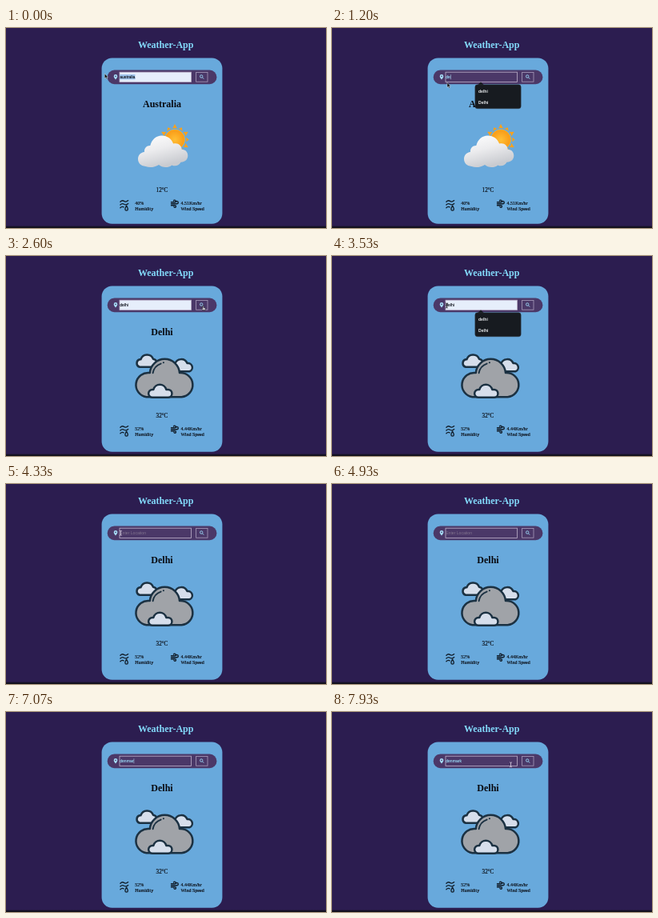
Recreate the animation shown at these times as an HTML page. Size 400x250 px, loop 8000 ms.

```html
<!DOCTYPE html>
<html lang="en">
<head>
<meta charset="utf-8">
<title>Weather-App</title>
<style>
html, body { margin: 0; width: 100%; height: 100%; overflow: hidden; background: #2c1d50; }
svg { display: block; width: 100vw; height: 100vh; }
text { font-family: "Liberation Serif", serif; fill: #080a10; }
.bold { font-weight: 700; font-size: 12px; text-anchor: middle; }
.small { font-size: 6px; }
#details text { stroke: #080a10; stroke-width: .15; }
.sans { font-family: "Liberation Sans", sans-serif; font-size: 5.1px; }
.ink { fill: none; stroke: #101c28; stroke-linecap: round; stroke-linejoin: round; }
.cloud { stroke: #1b3142; stroke-width: 2.5; stroke-linejoin: round; }
</style>
</head>
<body>
<svg viewBox="0 0 400 250">
  <defs>
    <linearGradient id="puff" x1="0" y1="0" x2=".4" y2="1">
      <stop offset="0" stop-color="#fff"/><stop offset=".5" stop-color="#ececee"/><stop offset="1" stop-color="#c9cbd0"/>
    </linearGradient>
    <radialGradient id="sunFill">
      <stop offset="0" stop-color="#ffbf35"/><stop offset="1" stop-color="#f99a16"/>
    </radialGradient>
    <linearGradient id="shade" x1="0" y1="0" x2="0" y2="1">
      <stop offset="0" stop-color="#2c1d50"/><stop offset=".6" stop-color="#11101a"/>
    </linearGradient>
  </defs>

  <rect width="400" height="250" fill="#2c1d50"/>
  <rect y="247" width="400" height="3" fill="url(#shade)"/>
  <text class="bold" x="199.7" y="25" style="fill:#83dafb">Weather-App</text>
  <rect x="119.6" y="37.5" width="150.8" height="207.2" rx="13" fill="#68a9dc"/>

  <!-- search bar -->
  <rect x="126.7" y="52.6" width="136.7" height="17.6" rx="8.8" fill="#4b3868"/>
  <path d="M137 64.6C135.6 62.6 134.7 61.5 134.7 60.4a2.3 2.3 0 0 1 4.6 0C139.3 61.5 138.4 62.6 137 64.6Z" fill="#a9e2fb"/>
  <circle cx="137" cy="60.4" r=".8" fill="#4b3868"/>
  <rect id="field" x="142" y="55.2" width="89.4" height="12.2" stroke="#beb2cb" stroke-width=".8"/>
  <rect id="selection" x="142.2" y="58" height="6.4" fill="#9fc4ec"/>
  <text id="query" class="sans" x="142.2" y="63" stroke-width=".12"></text>
  <rect id="caret" y="58.2" width=".5" height="6" fill="#b7e6fb"/>
  <rect x="237.6" y="55.4" width="14.4" height="11.8" fill="none" stroke="#a99bbb" stroke-width=".8"/>
  <g fill="none" stroke="#9bd9f7" stroke-width=".9">
    <circle cx="244.2" cy="60.5" r="1.7"/><path d="M245.5 61.8l1.7 1.8"/>
  </g>

  <!-- report -->
  <text id="city" class="bold" x="195" y="98.8"></text>
  <g id="details">
    <text id="degrees" x="195" y="204.5" font-size="7.2" text-anchor="middle"></text>
    <text id="humidity" class="small" x="161.2" y="220.6"></text>
    <text class="small" x="161.2" y="227.6">Humidity</text>
    <text id="wind" class="small" x="218.4" y="220.6"></text>
    <text class="small" x="218.4" y="227.6">Wind Speed</text>
    <g class="ink" stroke-width="1.3">
      <path d="M142.9 217.2q2.2-2.4 4.6-.8t5.2-.8M142.9 221q2.2-2.4 4.6-.8t5.2-.8M142.9 224.8q2-2.2 4.2-.9"/>
      <path d="M150.6 222c-1.2 2.2-1.7 3.2-1.7 4.4a1.7 1.7 0 0 0 3.4 0c0-1.2-.5-2.2-1.7-4.4Z"/>
    </g>
    <g class="ink" stroke-width="1.35" transform="translate(.7 .5)">
      <path d="M205.8 217.2h4.2a1.3 1.3 0 1 0-1.2-1.7M205.8 219.2h7.2a1.6 1.6 0 1 0-1.5-2.2M205.8 221.2h4.6a1.3 1.3 0 1 1-1.2 1.7"/>
    </g>
  </g>

  <g id="sunny">
    <g id="rays" fill="#f8a11d"></g>
    <circle cx="211" cy="139.5" r="12.4" fill="url(#sunFill)" stroke="#fbb62e" stroke-width=".8"/>
    <path d="M174.5 173C168 172.5 165 168.5 165 163.8c0-4.8 3.3-8.2 8-8.7-.5-4.8 3-8.3 7.3-8.1 1.6-7.2 7.2-12.6 14.5-12.6 6.9 0 12.3 4.2 14.3 10.2 5.7-1.6 10.3 1.9 10.6 7.2 4.6.1 7.6 3.4 7.6 7.7 0 4.8-3.7 8.3-8.8 8.2-2.4 4.2-7.2 5.8-11.2 3.7-4.5 3.7-12.2 3.5-16.2-.4-5 3.2-11.7 4-16.6 2Z" fill="url(#puff)"/>
  </g>

  <g id="cloudy" class="cloud">
    <path d="M167 138.8a5 5 0 0 1 .2-9.6h1.3a8.2 8.2 0 0 1 15.5-.5 5.3 5.3 0 0 1 1.3 10.1Z" fill="#d6deeb"/>
    <path d="M212 144.3l-3-9.2h2.2a8.1 8.1 0 0 1 15.3-1 5.3 5.3 0 0 1 2.8 10.2Z" fill="#d6deeb"/>
    <path d="M175.5 176.2A15.2 15.2 0 1 1 179.8 146.1 18.65 18.65 0 0 1 217 146.1 15.1 15.1 0 1 1 219.5 176.2Z" fill="#a0a3a8"/>
    <path d="M183.6 146.2a15 15 0 0 1 10-11.6M196.8 133.2h.2" fill="none" stroke-linecap="round" stroke-width="2"/>
    <path d="M183 176.8a4.9 4.9 0 0 1 .1-9.8h1.2a8.3 8.3 0 0 1 16-.1h2a4.9 4.9 0 0 1 .4 9.9Z" fill="#d6deeb"/>
  </g>

  <g id="menu">
    <path d="M182 71.2l4-3.6 4 3.6Z" fill="#171b20"/>
    <rect x="178.8" y="70.8" width="57.4" height="30" rx="3" fill="#171b20" stroke="#343c44" stroke-width=".4"/>
    <rect id="hover" x="180.5" y="74" width="54" height="11" rx="1.5" fill="#3a4149"/>
    <g style="font-weight:700">
      <text class="sans" x="183" y="81.2" style="fill:#e4e7ea">delhi</text>
      <text class="sans" x="183" y="94.6" style="fill:#e4e7ea">Delhi</text>
    </g>
  </g>

  <g id="pointer">
    <path id="arrow" d="M0 0v6l1.4-1.2 1 2.1 1-.5-1-2h1.9Z" fill="#0a0a0c" stroke="#e9edf2" stroke-width=".45"/>
    <path id="beam" d="M-1.4-3Q0-3 0-2 0-3 1.4-3M0-2V2M-1.4 3Q0 3 0 2 0 3 1.4 3" fill="none" stroke-width=".8"/>
    <path id="hand" d="M-.7 3.4L-2.2 1.3q.3-.8 1.5.2V-2q.6-.9 1.2 0V0l2 .6q.7.5.4 1.6l-.5 1.5Z" fill="#c9c6d2" stroke="#15151a" stroke-width=".6"/>
  </g>
</svg>
<script>
const LOOP = 8000;
const $ = id => document.getElementById(id);
const show = (id, on) => { $(id).style.display = on ? '' : 'none'; };

// time, text, look of the field
const typing = [
  [0, 'australia', 'selected'], [400, '', 'typed'], [670, 'd', 'typed'], [870, 'de', 'typed'],
  [1670, 'delhi', 'filled'], [3870, '', 'typed'],
  [5400, 'd', 'typed'], [5600, 'de', 'typed'], [5800, 'den', 'typed'], [6470, 'denm', 'typed'],
  [7070, 'denmar', 'typed'], [7200, 'denmark', 'typed']
];
const menuTimes = [[670, 1670], [3200, 3870], [5400, 5730]];

// time, x, y, shape
const moves = [
  [0, 123.3, 57, 'arrow'], [100, 123.3, 57, 'arrow'], [800, 144, 68.3, 'arrow'],
  [1200, 144, 68.3, 'arrow'], [1570, 190, 78, 'arrow'], [1800, 190, 78, 'arrow'],
  [2250, 246.4, 64.2, 'hand'], [2870, 246.4, 64.2, 'hand'], [3000, 222, 62, 'beam'],
  [3450, 143.4, 62, 'beam'], [3870, 143.4, 61.3, 'beam'], [4930, 0, 0, ''],
  [7600, 146, 62, 'beam'], [7870, 223.5, 65.8, 'beam'], [LOOP, 223.5, 65.8, 'beam']
];
const reports = [
  { city: 'Australia', degrees: '12°C', humidity: '40%', wind: '4.51Km/hr' },
  { city: 'Delhi', degrees: '32°C', humidity: '52%', wind: '4.44Km/hr' }
];
const REPORT_AT = 2470;

const within = (t, [from, to]) => t >= from && t < to;
const indexAt = (table, t) => table.findLastIndex(row => row[0] <= t);
const ease = p => p * p * (3 - 2 * p);

$('rays').innerHTML = Array.from({ length: 12 }, (_, i) =>
  `<path d="M207.9 125.8Q211 124.4 214.1 125.8L211 ${i % 2 ? 121.8 : 120.1}Z" transform="rotate(${i * 30} 211 139.5)"/>`
).join('');

function drawField(t) {
  const [, text, look] = typing[indexAt(typing, t)];
  const light = look !== 'typed';
  const query = $('query');
  query.textContent = text || 'Enter Location';
  const color = !text ? '#82758f' : light ? '#10141c' : '#9bdcf8';
  query.style.fill = color;
  query.style.stroke = text ? color : 'none';
  $('field').setAttribute('fill', light ? '#e6eefb' : '#4b3868');
  const width = query.getComputedTextLength();
  show('selection', look === 'selected');
  $('selection').setAttribute('width', width);
  show('caret', text && !light && t < 7600);
  $('caret').setAttribute('x', 142.4 + width);
}

function drawPointer(t) {
  const i = indexAt(moves, t);
  const [start, x, y, shape] = moves[i];
  const [end, nextX, nextY, next] = moves[i + 1];
  const moving = shape && next;
  const p = moving ? ease((t - start) / (end - start)) : 0;
  const px = x + (nextX - x) * p, py = y + (nextY - y) * p;
  const current = shape && (px > 237 && py < 68 ? 'hand' : shape === 'hand' ? 'beam' : shape);
  for (const id of ['arrow', 'beam', 'hand']) show(id, id === current);
  $('beam').setAttribute('stroke', t < 3870 ? '#15151a' : '#d8d0e2');
  $('pointer').setAttribute('transform', `translate(${px} ${py})`);
}

function draw(t) {
  const changed = t >= REPORT_AT;
  Object.entries(reports[+changed]).forEach(([id, text]) => { $(id).textContent = text; });
  show('sunny', !changed);
  show('cloudy', changed);
  // The cloud picture is shorter, so the details sit higher.
  $('details').setAttribute('transform', `translate(0 ${changed ? -3 : 0})`);
  show('menu', menuTimes.some(span => within(t, span)));
  show('hover', within(t, [1500, 1670]));
  drawField(t);
  drawPointer(t);
}

const began = performance.now();
function tick() {
  draw((performance.now() - began) % LOOP);
  requestAnimationFrame(tick);
}
tick();
</script>
</body>
</html>
```
